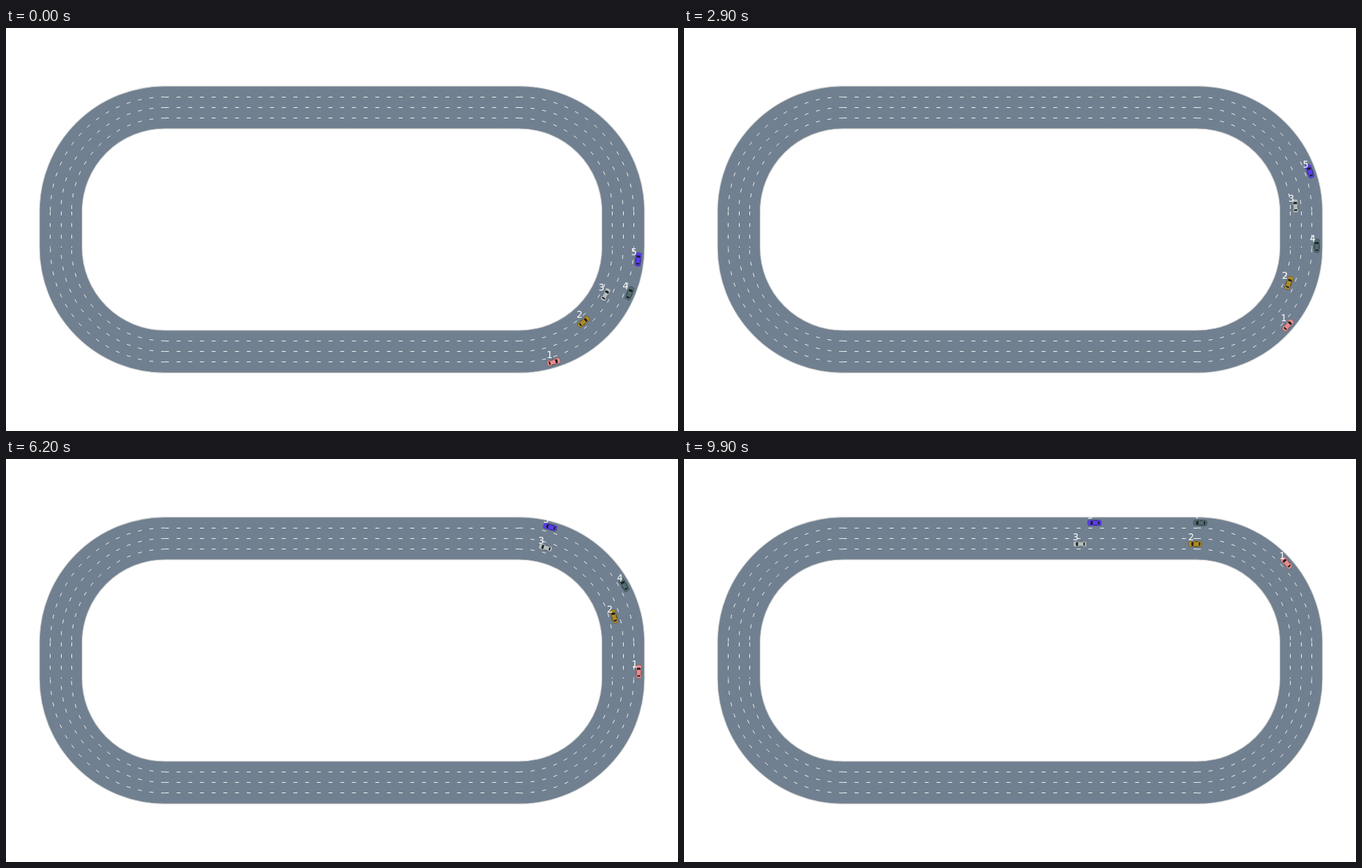
Animation of 966x580 px, one loop 10000 ms. Source, as an HTML page:

```html
<!DOCTYPE html>
<html lang="en">
<head>
<meta charset="utf-8">
<title>Traffic loop</title>
<style>
  html, body { margin: 0; width: 100%; height: 100%; overflow: hidden; background: #fff; }
  svg { display: block; }
  text { font: 13.3px "DejaVu Sans", sans-serif; fill: #fff; }
  .edge { stroke: #d3d3d3; stroke-width: 1.1; }
  .road { fill: #708090; }
  .infield { fill: #fff; }
  .dash { fill: none; stroke: #f5f5f5; stroke-width: 1; stroke-dasharray: 5.6 11.2; }
</style>
</head>
<body>
<svg id="stage" width="966" height="580" viewBox="0 0 966 580">
  <defs>
    <g id="car">
      <rect x="-9.8" y="-4.1" width="19.6" height="8.2" rx="2.8" stroke="#1c2226" stroke-opacity=".4" stroke-width=".7"/>
      <path d="M2.4-3 5.4-2.6Q6.3 0 5.4 2.6L2.4 3Q3 0 2.4-3Z" fill="#1c2226"/>
      <path d="M-5.2-2.6-7-2.3Q-7.6 0-7 2.3L-5.2 2.6Z" fill="#1c2226"/>
      <path d="M-4.4-3.3H1.2M-4.4 3.3H1.2" stroke="#1c2226" stroke-opacity=".75" stroke-width=".7"/>
    </g>
  </defs>
</svg>
<script>
const stage = document.getElementById('stage');
const LEFT = 228.5, RIGHT = 737.5, TOP = 264, BOTTOM = 316;
const OUTER = 180.4, INNER = 119, LANE = 15.25;

function add(tag, attrs) {
  const el = document.createElementNS('http://www.w3.org/2000/svg', tag);
  for (const k in attrs) el.setAttribute(k, attrs[k]);
  return stage.appendChild(el);
}

function oval(r, cls) {
  add('rect', {
    x: LEFT - r, y: TOP - r, rx: r, class: `edge ${cls}`,
    width: RIGHT - LEFT + 2 * r, height: BOTTOM - TOP + 2 * r
  });
}

// Straights sit on whole pixel rows; every straight and bend restarts the dashes.
function laneLine(r) {
  const snap = v => Math.floor(v) + 0.5;
  const bend = (x, y, sx, sy) =>
    `M${x} ${y + sy * r}A${r} ${r} 0 0 ${sx * sy < 0 ? 1 : 0} ${x + sx * r} ${y}`;
  add('path', {
    class: 'dash',
    d: `M${LEFT} ${snap(TOP - r)}H${RIGHT}M${LEFT} ${snap(BOTTOM + r)}H${RIGHT}` +
       `M${snap(LEFT - r)} ${TOP}V${BOTTOM}M${snap(RIGHT + r)} ${TOP}V${BOTTOM}` +
       bend(LEFT, TOP, -1, -1) + bend(RIGHT, TOP, 1, -1) +
       bend(LEFT, BOTTOM, -1, 1) + bend(RIGHT, BOTTOM, 1, 1)
  });
}

oval(OUTER, 'road');
oval(INNER, 'infield');
for (let i = 1; i < 4; i++) laneLine(INNER + i * LANE);

// Distance driven along the lane, counted from the start of the lower right bend.
const KNOTS = [0, 5, 12, 28, 50, 60, 74, 97];
const FAR = 172.1, NEAR = 141.6;
const cars = [
  { r: FAR,  color: '#e88a8c', s: [50.6, 65.3, 90.3, 148.6, 237.2, 280.3, 342.4, 447.6] },
  { r: NEAR, color: '#ad8a26', s: [101.3, 110.6, 126.4, 170.4, 264.9, 312.3, 381.4, 499.3] },
  { r: NEAR, color: '#b4bcbe', s: [152.1, 169.8, 200.4, 282.4, 403.4, 458.4, 536.8, 665.3] },
  { r: FAR,  color: '#526c70', s: [202.8, 212.4, 228.4, 272.8, 362.7, 408.4, 475.1, 588.1] },
  { r: FAR,  color: '#5a3cf0', s: [253.3, 270.6, 303.3, 381.2, 495.4, 547.3, 620.1, 740.1] }
];

for (const car of cars) car.body = add('use', { href: '#car', fill: car.color });
cars.forEach((car, i) => {
  car.label = add('text', {});
  car.label.textContent = i + 1;
});

// Smooth curve through the knots, with slopes weighted by knot spacing.
function distance(s, n) {
  const last = KNOTS.length - 1;
  const gap = i => KNOTS[i + 1] - KNOTS[i];
  const rate = i => (s[i + 1] - s[i]) / gap(i);
  const slope = i => {
    if (i === 0) return rate(0) - (rate(1) - rate(0)) * gap(0) / (gap(0) + gap(1));
    if (i === last) return rate(last - 1);
    return (gap(i) * rate(i - 1) + gap(i - 1) * rate(i)) / (gap(i) + gap(i - 1));
  };
  let i = 0;
  while (i < last - 1 && n >= KNOTS[i + 1]) i++;
  const h = gap(i), u = (n - KNOTS[i]) / h, v = 1 - u;
  return s[i] * v * v * (1 + 2 * u) + s[i + 1] * u * u * (3 - 2 * u) +
         h * u * v * (slope(i) * v - slope(i + 1) * u);
}

function pose(r, s) {
  const bend = r * Math.PI / 2, side = BOTTOM - TOP;
  const onArc = (a, cy) => [RIGHT + r * Math.sin(a), cy + r * Math.cos(a), a];
  if (s < bend) return onArc(s / r, BOTTOM);
  s -= bend;
  if (s < side) return [RIGHT + r, BOTTOM - s, Math.PI / 2];
  s -= side;
  if (s < bend) return onArc(Math.PI / 2 + s / r, TOP);
  return [RIGHT - (s - bend), TOP - r, Math.PI];
}

function draw(now) {
  const tick = Math.floor(now % 10000 / 100);
  const n = tick - (tick >= 6) - (tick >= 46); // two ticks stand still
  for (const car of cars) {
    const [x, y, a] = pose(car.r, distance(car.s, n));
    car.body.setAttribute('transform', `translate(${x} ${y}) rotate(${-a * 180 / Math.PI})`);
    car.label.setAttribute('x', x - 10.2);
    car.label.setAttribute('y', y - 5.7);
  }
}

const start = performance.now();
function loop() {
  draw(performance.now() - start);
  requestAnimationFrame(loop);
}
loop();
</script>
</body>
</html>
```
